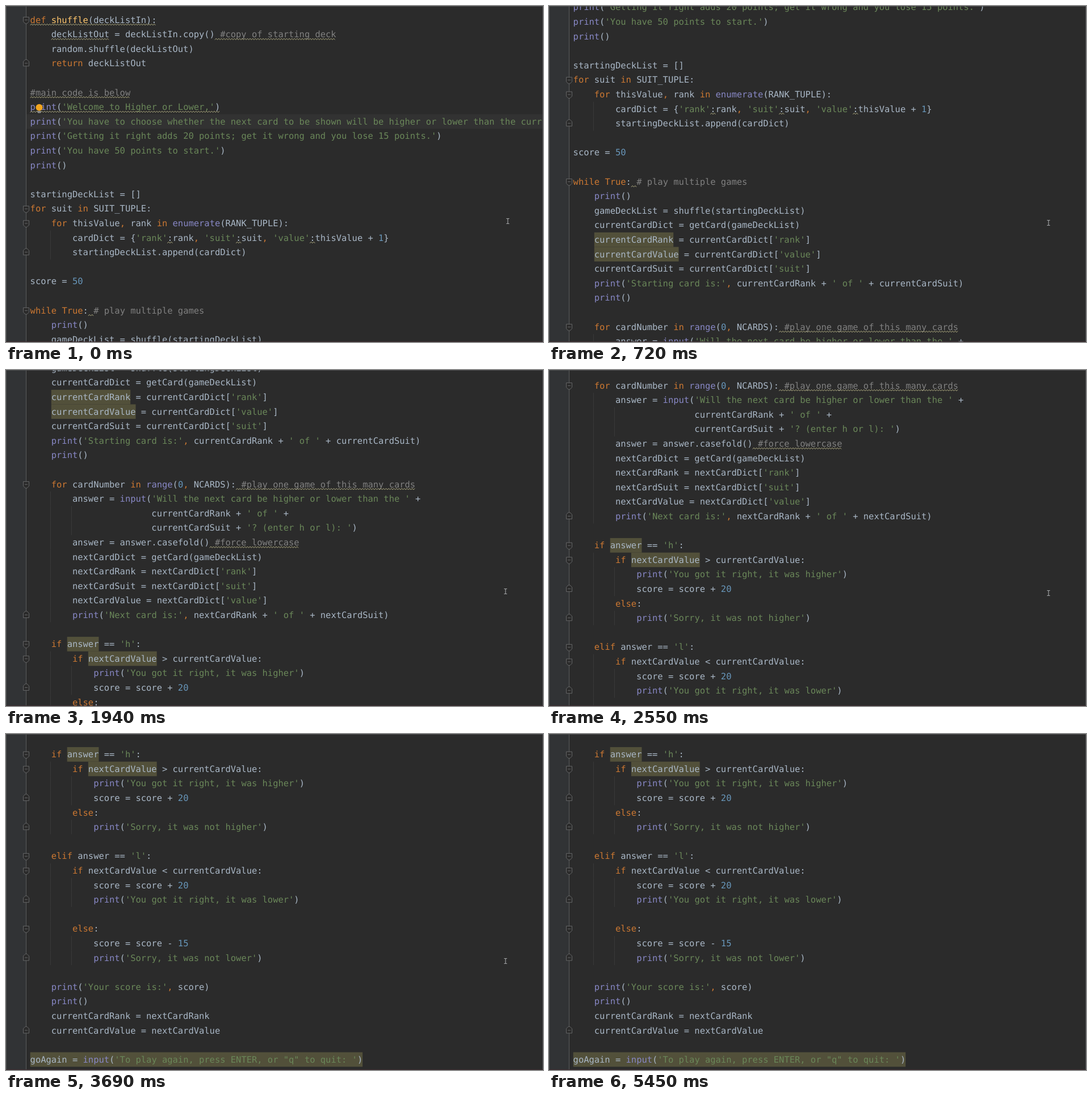
Animation, 946 px wide and 592 px high, one loop 6.07 s. Source, as an HTML page:

```html
<!DOCTYPE html>
<html lang="en">
<head>
<meta charset="utf-8">
<title>Scrolling code</title>
<style>
  html, body { margin: 0; width: 100%; height: 100%; overflow: hidden; background: #2b2b2b; }
  svg { display: block; }
  text {
    font: 15.44px "DejaVu Sans Mono", monospace;
    white-space: pre;
    text-rendering: geometricPrecision;
    fill: #a9b7c6;
  }
  .keyword { fill: #cc7832; }
  .string { fill: #6a8759; }
  .comment { fill: #808080; }
  .number { fill: #6897bb; }
  .builtin { fill: #8888c6; }
  .name { fill: #ffc66d; }
  .mark { fill: #52503a; }
  .guide { fill: #393939; }
  .wave { fill: none; stroke: #aeaa80; }
  .fold { fill: #2b2b2b; stroke: #646566; }
  #cursor { fill: none; stroke: #b4b6b8; }
</style>
</head>
<body>
<svg width="946" height="592">
  <rect width="35" height="592" fill="#313335"/>
  <g id="page"></g>
  <path id="cursor" d="M-2.5-4.5H-1L0-4L1-4.5H2.5M0-4V4M-2.5 4.5H-1L0 4L1 4.5H2.5"/>
  <path d="M0 .5H946M945.5 0V592M.5 0V592" stroke="#4d4e4f"/>
  <path d="M0 591.5H946" stroke="#3d2c30"/>
</svg>
<script>
// «...» is highlighted, ‹...› has a wavy underline
const code = `‹def shuffle(deckListIn):›
    ‹deckListOut› = deckListIn.copy()‹ #copy of starting deck›
    random.shuffle(deckListOut)
    return deckListOut

‹#main code is below›
‹print('Welcome to Higher or Lower,')›
print('You have to choose whether the next card to be shown will be higher or lower than the curr
print('Getting it right adds 20 points; get it wrong and you lose 15 points.')
print('You have 50 points to start.')
print()

startingDeckList = []
for suit in SUIT_TUPLE:
    for thisValue, rank in enumerate(RANK_TUPLE):
        cardDict = {'rank'‹:›rank, 'suit'‹:›suit, 'value'‹:›thisValue + 1}
        startingDeckList.append(cardDict)

score = 50

while True:‹ ›# play multiple games
    print()
    gameDeckList = shuffle(startingDeckList)
    currentCardDict = getCard(gameDeckList)
    «currentCardRank» = currentCardDict['rank']
    «currentCardValue» = currentCardDict['value']
    currentCardSuit = currentCardDict['suit']
    print('Starting card is:', currentCardRank + ' of ' + currentCardSuit)
    print()

    for cardNumber in range(0, NCARDS):‹ #play one game of this many cards›
        answer = input('Will the next card be higher or lower than the ' +
                       currentCardRank + ' of ' +
                       currentCardSuit + '? (enter h or l): ')
        answer = answer.casefold()‹ #force lowercase›
        nextCardDict = getCard(gameDeckList)
        nextCardRank = nextCardDict['rank']
        nextCardSuit = nextCardDict['suit']
        nextCardValue = nextCardDict['value']
        print('Next card is:', nextCardRank + ' of ' + nextCardSuit)

    if «answer» == 'h':
        if «nextCardValue» > currentCardValue:
            print('You got it right, it was higher')
            score = score + 20
        else:
            print('Sorry, it was not higher')

    elif answer == 'l':
        if nextCardValue < currentCardValue:
            score = score + 20
            print('You got it right, it was lower')

        else:
            score = score - 15
            print('Sorry, it was not lower')

    print('Your score is:', score)
    print()
    currentCardRank = nextCardRank
    currentCardValue = nextCardValue

«goAgain = input('To play again, press ENTER, or "q" to quit: ')»`.split("\n");

const LEFT = 42.6, CHAR = 9.295, ROW = 25.6, TOP = 11.5, LOOP = 6070, STEP = 121;
const colX = col => LEFT + col * CHAR;
const rowY = row => TOP + row * ROW;
const midY = row => rowY(row) + ROW / 2;

const token = new RegExp([
  "(?<comment>#.*)",
  "(?<string>'[^']*'?)",
  "(?<name>(?<=def )\\w+)",
  "(?<keyword>\\b(?:def|return|for|in|while|True|if|elif|else)\\b|,)",
  "(?<builtin>\\b(?:print|enumerate|range|input)\\b)",
  "(?<number>\\b\\d+\\b)"
].join("|"), "g");

function drawText(line, row) {
  const html = line.replace("<", "&lt;").replace(token, (...match) => {
    const groups = match.at(-1);
    const kind = Object.keys(groups).find(key => groups[key]);
    return `<tspan class="${kind}">${match[0]}</tspan>`;
  });
  return `<text x="${LEFT}" y="${rowY(row) + 18}">${html}</text>`;
}

const box = (kind, x, row, width) =>
  `<rect class="${kind}" x="${x}" y="${rowY(row)}" width="${width}" height="${ROW}"/>`;

const drawMark = (row, from, to) => box("mark", colX(from), row, (to - from) * CHAR);

function drawWave(row, from, to) {
  const points = [];
  for (let x = colX(from), i = 0; x <= colX(to); x += 2.3, i++)
    points.push([x, midY(row) + (i % 2 ? 7.2 : 9.7)]);
  return `<polyline class="wave" points="${points.join(" ")}"/>`;
}

const drawFold = (row, dir) =>
  `<path class="fold" transform="translate(35.5 ${midY(row) + (dir > 0 ? .8 : -.7)}) scale(1 ${dir})"
    d="M-5-5.5H5V2.5L1.5 6H-1.5L-5 2.5ZM-2.5-.5H2.5"/>`;

// Separate the plain text from its marks and waves
const below = [], above = [];
const lines = code.map((source, row) => {
  let text = "", from = 0;
  for (const char of source) {
    if ("«‹".includes(char)) from = text.length;
    else if (char === "»") below.push(drawMark(row, from, text.length));
    else if (char === "›") above.push(drawWave(row, from, text.length));
    else text += char;
  }
  return text;
});

// A blank line takes the indent of the line after it
const indents = lines.map((line, row) => (line || lines[row + 1]).search(/\S/));

indents.forEach((indent, row) => {
  for (const col of [4, 8])
    if (indent > col) below.push(box("guide", Math.floor(colX(col)) - 1, row, 1));
});

// Blocks of more than one line can be folded
const folds = new Map();
lines.forEach((line, row) => {
  if (!/:( *#.*)?$/.test(line)) return;
  let end = row;
  while (indents[end + 1] > indents[row]) end++;
  if (end > row + 1) folds.set(row, 1).set(end, -1);
});

const bulbY = midY(6);
const bulb = `<circle cx="58.5" cy="${bulbY + .8}" r="6" fill="#f2a51f"/>
  <path d="M55 ${bulbY + 8}h7m-6 2h5" stroke="#a9abad" stroke-width="1.2"/>`;

const page = document.getElementById("page");
const cursor = document.getElementById("cursor");
page.innerHTML = [
  `<rect x="36" y="${rowY(7)}" width="909" height="${ROW}" fill="#323232"/>`,
  ...below,
  ...lines.map(drawText),
  ...above,
  `<rect x="35" y="0" width="1" height="2000" fill="#5a5b5c"/>`,
  ...Array.from(folds, ([row, dir]) => drawFold(row, dir)),
  bulb
].join("");

// Keys are [step, ...values], joined by straight lines
const scrollKeys = [[0, 0], [6, 227], [12, 376], [16, 591], [21, 765], [22, 800], [23, 800], [30, 1038]];
const cursorKeys = [[0, 884, 379], [6, 880, 382], [30, 880, 400], [35, 880, 400],
  [40, 852, 472], [42, 839, 510], [44, 885, 582]];

function track(keys, step) {
  const next = keys.findIndex(key => key[0] > step);
  if (next < 0) return keys.at(-1).slice(1);
  const a = keys[next - 1], b = keys[next];
  const part = (step - a[0]) / (b[0] - a[0]);
  return a.slice(1).map((value, i) => Math.round(value + (b[i + 1] - value) * part));
}

// The screen refreshes once per step
function draw(now) {
  const step = Math.floor((now % LOOP + 6) / STEP);
  const [scroll] = track(scrollKeys, step);
  const [x, y] = track(cursorKeys, step);
  page.setAttribute("transform", `translate(0 ${-scroll})`);
  cursor.setAttribute("transform", `translate(${x} ${y})`);
  cursor.setAttribute("visibility", step < 45 ? "visible" : "hidden");
}

const start = performance.now();
function loop() {
  draw(performance.now() - start);
  requestAnimationFrame(loop);
}
loop();
</script>
</body>
</html>
```
